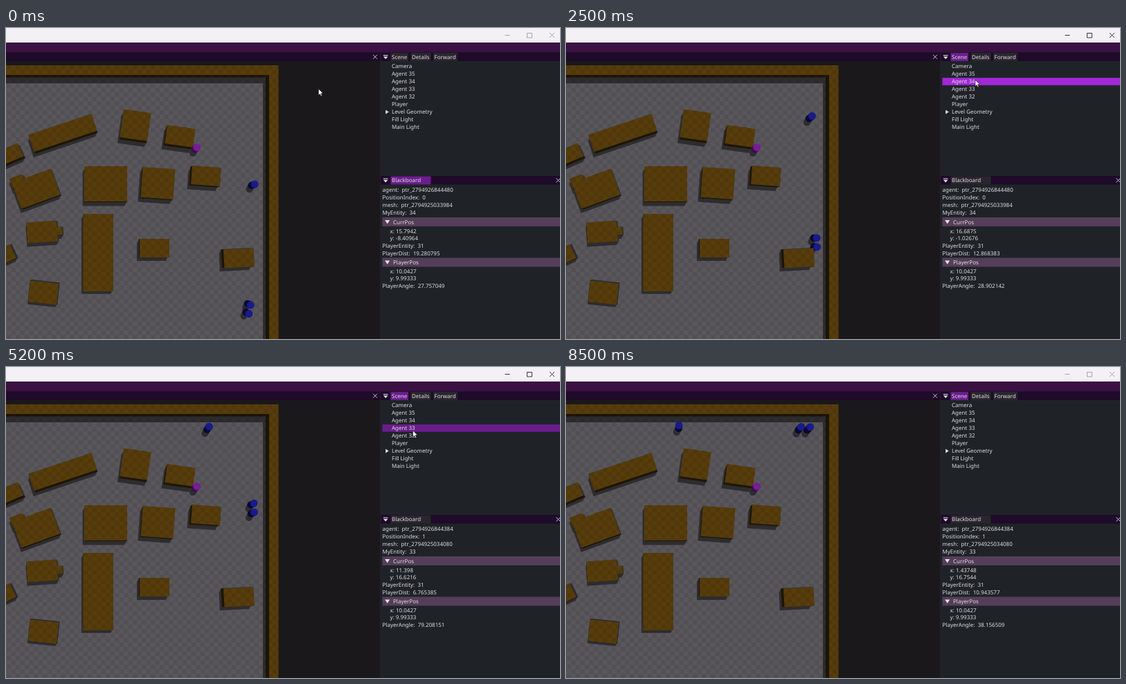
An HTML page for the animation above (8.6 s loop, 800 by 450 pixels).

```html
<!DOCTYPE html>
<html lang="en">
<head>
<meta charset="utf-8">
<title>Scene editor</title>
<style>
html, body { margin: 0; width: 100%; height: 100%; overflow: hidden; background: #1a181b; }
svg { display: block; width: 100vw; height: 100vh; }
text { font: 8px "Noto Sans", "Open Sans", sans-serif; fill: #dedee0; white-space: pre; text-rendering: geometricPrecision; }
</style>
</head>
<body>
<svg id="stage" viewBox="0 0 800 450">
  <defs>
    <pattern id="check" width="13" height="13" patternUnits="userSpaceOnUse" x="1" y="2">
      <path d="M0 0h6.5v6.5H0zM6.5 6.5H13V13H6.5z" fill="#000" fill-opacity=".08"/>
    </pattern>
    <clipPath id="view"><rect y="48" width="540" height="402"/></clipPath>
  </defs>
</svg>
<script>
const LOOP = 8600, STEP = 100, DEG = Math.PI / 180;
const stage = document.getElementById('stage');

function add(parent, tag, attrs, content) {
  const el = document.createElementNS('http://www.w3.org/2000/svg', tag);
  set(el, attrs);
  if (content !== undefined) el.textContent = content;
  parent.appendChild(el);
  return el;
}
function set(el, attrs) { for (const k in attrs) el.setAttribute(k, attrs[k]); }
const group = (parent, attrs = {}) => add(parent, 'g', attrs);
const rect = (parent, x, y, width, height, fill) => add(parent, 'rect', { x, y, width, height, fill });
const path = (parent, d, fill, more = {}) => add(parent, 'path', { d, fill, ...more });
const label = (x, y, content) => add(stage, 'text', { x, y }, content);
const poly = pts => 'M' + pts.map(p => p.map(v => v.toFixed(2)).join()).join('L') + 'Z';

// Top-down camera and sunlight
const EYE = [144.3, 303.5], DEPTH = 0.979, CAST = [-3, 5.5], UNIT = 13.08;
const project = (x, y) => [EYE[0] + UNIT * x, EYE[1] - UNIT * y];
const ground = p => p.map((v, i) => EYE[i] + (v - EYE[i]) * DEPTH);
const cast = (p, k = 1) => p.map((v, i) => v + CAST[i] * k);

const SHADE = '#2d2c2f', TOP = '#573d0c', SIDE = '#1e1504';
const view = group(stage, { 'clip-path': 'url(#view)' });
rect(view, 0, 48, 540, 402, '#1a181b');
rect(view, 0, 54, 393.5, 396, TOP);
rect(view, 0, 68, 380, 382, SIDE);
rect(view, 0, 71.5, 375, 379, SHADE);
rect(view, 0, 80, 371, 370, '#59575c');
rect(view, 0, 54, 393.5, 396, 'url(#check)');
const shadows = group(view), agentLayer = group(view), boxes = group(view);

function box(cx, cy, w, h, deg = 0) {
  const c = Math.cos(deg * DEG) / 2, s = Math.sin(deg * DEG) / 2;
  const top = [[-w, -h], [w, -h], [w, h], [-w, h]].map(([x, y]) => [cx + x * c - y * s, cy + x * s + y * c]);
  const base = top.map(ground);
  for (let k = 0; k <= 1; k += 0.25) path(shadows, poly(base.map(p => cast(p, k))), SHADE);
  // Only the left and lower faces lie in shade
  for (const [i, j] of [[2, 3], [3, 0]]) path(boxes, poly([top[i], top[j], base[j], base[i]]), SIDE);
  for (const fill of [TOP, 'url(#check)']) path(boxes, poly(top), fill);
}
box(82, 151.5, 96, 26, -18.5);
box(187, 140.5, 40, 41, 8);
box(251.5, 156.5, 41, 27, 8);
box(7, 182, 31, 21, -23);
box(17, 222, 20, 16, -20);
box(43.5, 232.5, 60, 40, -20);
box(144, 225.5, 62, 51);
box(219.5, 224.5, 47, 44, 4);
box(289, 214, 42, 27, 4);
box(77, 293.5, 9, 12, -5);
box(52, 295, 44, 30, -4);
box(133, 325, 43.5, 112);
box(214.5, 318.5, 43, 27);
box(336.5, 333, 43.5, 27, -3);
box(1, 327, 20, 22, -25);
box(54, 383, 41.5, 31, 6);

function makePawn(layer, head, body) {
  const line = (parent, stroke, width) =>
    add(parent, 'line', { stroke, 'stroke-width': width, 'stroke-linecap': 'round' });
  return {
    shadow: line(shadows, SHADE, 10),
    body: line(layer, body, 10.2),
    head: add(layer, 'circle', { r: 5.4, fill: head })
  };
}
function placePawn(pawn, x, y) {
  const h = project(x, y), b = ground(h), s = cast(b);
  const span = (p, q) => ({ x1: p[0], y1: p[1], x2: q[0], y2: q[1] });
  set(pawn.shadow, span(b, s));
  set(pawn.body, span(h, b));
  set(pawn.head, { cx: h[0], cy: h[1] });
}

const PLAYER = [10.0427, 9.99333];
placePawn(makePawn(group(view), '#7a1d98', '#3a0d49'), ...PLAYER);

// Patrol route shared by three agents: time, x, y
const ROUTE = [
  [0, 15.7942, -8.40964], [1810, 16.767, -3.11], [8325, 16.016, 16.56],
  [8470, 16.016, 16.56], [13300, 1.43748, 16.7544]
];
const agents = {
  32: { lead: 330 },
  34: { lead: 0, ptr: '2794926844480', mesh: '2794925033984' },
  33: { lead: 4800, ptr: '2794926844384', mesh: '2794925034080' },
  35: { ptr: '2794926844576', mesh: '2794925033952' }
};
for (const id of [33, 32, 34]) agents[id].pawn = makePawn(agentLayer, '#1a1a8c', '#080834');

function along(keys, t, ease = k => k) {
  let i = 0;
  while (i < keys.length - 2 && t >= keys[i + 1][0]) i++;
  const [a, b] = [keys[i], keys[i + 1]];
  const k = ease(Math.min(1, Math.max(0, (t - a[0]) / (b[0] - a[0]))));
  return [a[1] + (b[1] - a[1]) * k, a[2] + (b[2] - a[2]) * k];
}
function position(id, t) {
  if (id !== 35) return along(ROUTE, t + agents[id].lead);
  const d = 0.00302 * (t - 4300), turn = -95.94 * DEG;
  return [-18.8714 + d * Math.cos(turn), 4.58163 + d * Math.sin(turn)];
}

// Window frame
rect(stage, 0, 0, 800, 21, '#f3f1f5');
rect(stage, 0, 21, 800, 14.5, '#3b1043');
rect(stage, 0, 35.5, 540, 12.5, '#1e0a29');
rect(stage, 540, 35.5, 260, 414.5, '#1f2327');
for (const y of [35.5, 214]) rect(stage, 541, y, 259, 12.5, '#1e0a29');
rect(stage, 540, 35.5, 1.2, 414.5, '#2c1a33');
rect(stage, 541, 213, 259, 1, '#2c1a33');
const stroke = (d, color) => path(stage, d, 'none', { stroke: color, 'stroke-width': 0.9 });
const winIcons = stroke('M720.5 10.5h7M752.5 7.5h7v6.5h-7zM785 7l7 7M792 7l-7 7', '#222');
const cross = (x, y) => stroke(`M${x - 3} ${y - 3}l6 6m0 -6l-6 6`, '#d8d4dc');
cross(533, 41.7);
cross(797.5, 220.5);

const TAB = '#2a262e', TAB_ON = '#6a1d8c';
function tab(x, y, width, name) {
  const back = rect(stage, x, y, width, 12, TAB);
  label(x + 1.5, y + 8.7, name);
  return back;
}
const sceneTab = tab(555.5, 36, 25.5, 'Scene');
tab(584.5, 36, 29, 'Details');
tab(617, 36, 35, 'Forward');
const boardTab = tab(555.5, 214.5, 58, 'Blackboard');
for (const y of [39, 217.6]) path(stage, `M544.8 ${y}h6.8v1h-6.8zm0 2.2h6.8l-3.4 3.8z`, '#e4e0e8');

// Scene list
const ROW = 11.04, ROW_TOP = 50;
const glow = rect(stage, 543.5, 0, 256.5, 10.7, TAB_ON);
['Camera', 'Agent 35', 'Agent 34', 'Agent 33', 'Agent 32', 'Player', 'Level Geometry', 'Fill Light', 'Main Light']
  .forEach((name, i) => label(557, 58 + ROW * i, name));
path(stage, 'M548.2 118.4v6l4.6 -3z', '#dedee0');

// Blackboard, laid out from top to bottom
let pen = 225.6;
const field = (content = '') => label(543.5, pen += 11.2, content);
const part = (content = '') => label(554.5, pen += 9.6, content);
function header(name) {
  pen += 3.6;
  rect(stage, 543.5, pen, 256.5, 13, '#553e59');
  path(stage, `M547.2 ${pen + 4}h7l-3.5 5.4z`, '#e4e0e8');
  label(559, pen + 9.5, name);
  pen += 13.3;
}
const fields = { agent: field(), index: field(), mesh: field(), entity: field() };
header('CurrPos');
fields.x = part();
fields.y = part();
field('PlayerEntity:  31');
fields.dist = field();
header('PlayerPos');
part('x: ' + PLAYER[0]);
part('y: ' + PLAYER[1]);
fields.angle = field();

const short = v => String(Number(v.toPrecision(6)));
function showBoard(id, t) {
  const [x, y] = position(id, t), [nextX, nextY] = position(id, t + 200);
  const dx = PLAYER[0] - x, dy = PLAYER[1] - y;
  const turn = Math.atan2(nextY - y, nextX - x);
  const facing = Math.cos(Math.atan2(dy, dx) - turn);
  const values = {
    agent: 'agent:  ptr_' + agents[id].ptr,
    index: 'PositionIndex:  ' + (id === 35 ? 2 : +(y >= 16.56)),
    mesh: 'mesh:  ptr_' + agents[id].mesh,
    entity: 'MyEntity:  ' + id,
    x: 'x: ' + short(x),
    y: 'y: ' + short(y),
    dist: 'PlayerDist:  ' + Math.hypot(dx, dy).toFixed(6),
    angle: 'PlayerAngle:  ' + (Math.acos(facing) / DEG).toFixed(6)
  };
  for (const k in values) fields[k].textContent = values[k];
}

// Each click: time, cursor place, agent
const CLICKS = [
  [1600, 588.5, 93, 33], [2400, 591, 75, 34], [3200, 593, 63.2, 35],
  [4200, 588, 62.8, 35], [4900, 587.6, 92, 33]
];
const HOLD = 300, SETTLE = 200;
const mouse = [
  [0, 451.3, 88],
  ...CLICKS.flatMap(([t, x, y]) => [[t - SETTLE, x, y], [t + HOLD, x, y]]),
  [6000, 812, 92]
];
const smooth = k => k * k * (3 - 2 * k);
const cursor = path(stage, 'M0 0V9.3L2.1 7.4 3.5 10.6 5 9.9 3.6 6.8 6.5 6.6Z', '#fff',
  { stroke: '#111', 'stroke-width': 0.6 });

function draw(t) {
  for (const id of [32, 33, 34]) placePawn(agents[id].pawn, ...position(id, t));
  const picked = CLICKS.filter(c => t > c[0]).pop();
  showBoard(picked ? picked[3] : 34, t);

  const [mx, my] = along(mouse, t, smooth);
  set(cursor, { transform: `translate(${mx} ${my})` });
  set(glow, {
    y: ROW_TOP + ROW * Math.floor((my - ROW_TOP) / ROW),
    fill: CLICKS.some(([c]) => t >= c && t < c + HOLD) ? '#a028d6' : TAB_ON,
    visibility: mx > 543 && mx < 800 ? 'visible' : 'hidden'
  });

  const onScene = t >= 1600 && t < 3900 || t >= 4900;
  set(sceneTab, { fill: onScene ? TAB_ON : TAB });
  set(boardTab, { fill: onScene ? TAB : TAB_ON });
  set(winIcons, { stroke: t >= 1600 && t < 8300 ? '#222' : '#9c9a9e' });
}

function tick() {
  draw(Math.floor(performance.now() % LOOP / STEP) * STEP);
  requestAnimationFrame(tick);
}
tick();
</script>
</body>
</html>
```
